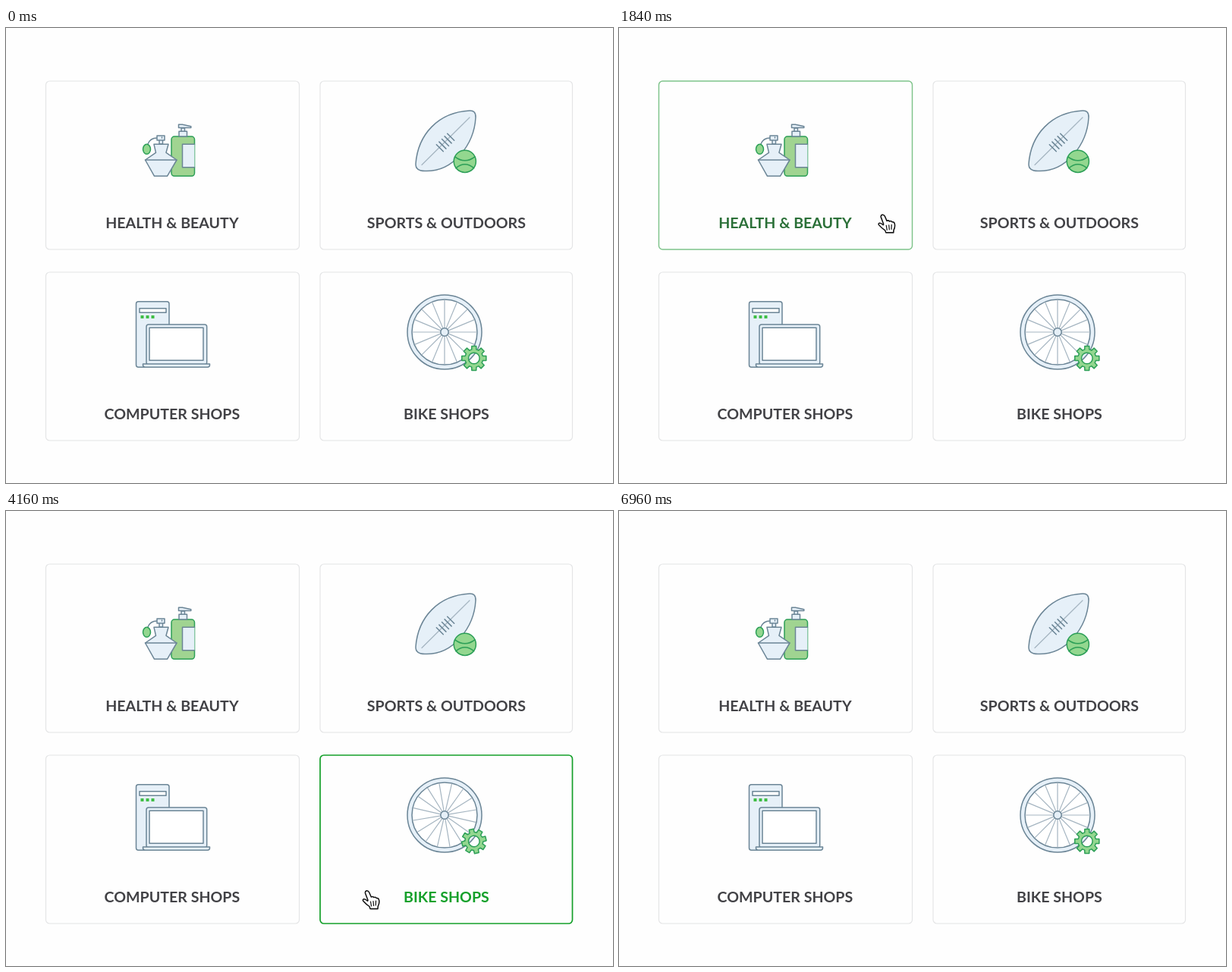
An HTML page for the animation above (7000 ms loop, 800 px wide and 600 px high).

```html
<!DOCTYPE html>
<html lang="en">
<head>
<meta charset="utf-8">
<title>Shop categories</title>
<style>
  html, body { margin: 0; width: 100%; height: 100%; overflow: hidden; background: #fefefe; }
  svg { display: block; width: 800px; height: 600px; }
  text { font: 700 19.6px Lato, "Open Sans", sans-serif; text-anchor: middle; }
  .card { fill: #fefefe; }
  .icon { fill: #e6f0f8; stroke: #6b8596; stroke-width: 1.5; stroke-linejoin: round; stroke-linecap: round; }
  .white { fill: #fff; }
  .line { fill: none; }
  .thin { stroke: #a5b5c1; stroke-width: 1.2; }
  .green { fill: #93d78f; stroke: #2c9f57; }
  .leaf { fill: #a0d491; }
</style>
</head>
<body>
<svg viewBox="0 0 800 600">
  <g id="cards"></g>

  <g class="icon">
    <path class="line" d="M187 153Q190 145 199 145"/>
    <ellipse class="green" cx="185.5" cy="159.8" rx="5" ry="6.5"/>
    <path d="M199 142h10v6h-10zM202 148h4.5v5h-4.5z"/>
    <path class="line" d="M205.5 144v1"/>
    <rect class="green leaf" x="218" y="143" width="30.5" height="52.3" rx="4"/>
    <path d="M248.5 153.3h-16v30.5h16"/>
    <path d="M195 153.3h19l-3 11 14 9.7-12.5 21.3h-17L183.5 174l14-9.7z"/>
    <path class="line" d="M183.5 174H225"/>
    <path d="M228 136.3h10.5v6.7H228zM231 132h4.5v4.3H231z"/>
    <path d="M227.5 127.2h5l11.3 2.6v1.8h-16.3z"/>
    <path id="drop" d="M0-4C1.1-2 2.4-.6 2.4 1A2.4 2.4 0 0 1-2.4 1C-2.4-.6-1.1-2 0-4z"/>
  </g>

  <g class="icon">
    <path d="M611 109Q619.5 108.500 619 118C617 153 590 190 552 188.500Q539.500 188.500 540 179C543 140 570 111 611 109z"/>
    <path class="thin" d="M548 180.500L611 118"/>
    <path id="laces" class="line"/>
    <g id="ball" class="green">
      <circle r="14.600"/>
      <path class="line" d="M-13-6Q0 4 13-6M-12 9Q0-1 12 9"/>
    </g>
  </g>

  <g class="icon">
    <rect x="171.5" y="360.8" width="43.5" height="86.500" rx="3"/>
    <rect class="white" x="176" y="369.800" width="35" height="5.400"/>
    <path d="M177.500 379h4v4h-4zm7 0h4v4h-4zm7 0h4v4h-4z" style="fill:#3fbd45;stroke:none"/>
    <rect x="185" y="391" width="79.700" height="53" rx="3"/>
    <rect class="white" x="189" y="395.300" width="71" height="43"/>
    <rect id="screen" x="189.7" width="69.600" style="fill:#93d78f;stroke:none"/>
    <path d="M180.500 443h88v1.500q0 2.700-3 2.700h-82q-3 0-3-2.700z"/>
  </g>

  <g class="icon">
    <circle cx="578" cy="401" r="49"/>
    <circle class="white" cx="578" cy="401" r="43"/>
    <path id="spokes" class="thin"/>
    <circle cx="578" cy="401" r="5.200"/>
    <path id="gear" class="green" fill-rule="evenodd"/>
  </g>

  <g id="hand" stroke-linejoin="round" stroke-linecap="round">
    <path id="shadow" fill="#000" opacity=".2" transform="translate(.5 1.500)"/>
    <path id="palm" fill="#fff" stroke="#111" stroke-width="1.500"/>
    <path d="M4.500 14l1 6M8 13.500l.6 6M11.500 13l-.2 6" fill="none" stroke="#111" stroke-width="1.200"/>
  </g>
</svg>
<script>
const LOOP = 7000;
const $ = id => document.getElementById(id);
const set = (el, attrs) => { for (const k in attrs) el.setAttribute(k, attrs[k]); };
const ramp = (t, a, b) => Math.min(1, Math.max(0, (t - a) / (b - a)));
const ease = p => p * p * (3 - 2 * p);
const move = (t, a, b) => ease(ramp(t, a, b));
const pulse = (t, on, off, time = 160) => move(t, on, on + time) - move(t, off, off + time);
const mix = (a, b, p) => `rgb(${a.map((v, i) => v + (b[i] - v) * p)})`;

const GREEN = [20, 160, 42], BORDER = [228, 229, 230], INK = [66, 66, 70];

// Left, top, label, hover start, hover end
const cards = [
  [52.5, 70, "HEALTH & BEAUTY", 520, 1760],
  [414, 70, "SPORTS & OUTDOORS", 1840, 3100],
  [52.5, 322, "COMPUTER SHOPS", 4560, 6220],
  [414, 322, "BIKE SHOPS", 3200, 4460]
].map(([x, y, name, on, off]) => {
  const make = (tag, attrs) => {
    const el = document.createElementNS("http://www.w3.org/2000/svg", tag);
    set(el, attrs);
    return $("cards").appendChild(el);
  };
  const box = make("rect", { class: "card", x, y, width: x < 100 ? 334 : 332.5, height: 222, rx: 5 });
  const label = make("text", { x: x + 166.4, y: y + 194 });
  label.textContent = name;
  return { box, label, on, off };
});

// Static paths built by rule
set($("laces"), { d: [-2, -1, 0, 1, 2].map(i =>
  `M${574.5 + i * 3.6} ${146.500 - i * 3.6}l9 9`).join("") });

let spokes = "";
for (let i = 0; i < 16; i++) {
  const a = i * Math.PI / 8, c = Math.cos(a), s = Math.sin(a);
  spokes += `M${5 * c} ${5 * s}L${42 * c} ${42 * s}`;
}
set($("spokes"), { d: spokes });

const teeth = [];
for (let i = 0; i < 8; i++)
  for (const [da, r] of [[-.26, 12], [-.18, 16.300], [.18, 16.300], [.26, 12]]) {
    const a = i * Math.PI / 4 + da;
    teeth.push(`${r * Math.cos(a)} ${r * Math.sin(a)}`);
  }
set($("gear"), { d: `M${teeth.join("L")}zM7.300 0A7.300 7.300 0 1 0-7.300 0A7.300 7.300 0 1 0 7.300 0z` });

const palm = "M-2.500 3Q-3 .5-.7-.2Q1.500-.5 2.700 2L5.300 8Q7.500 6.800 8.800 8.600Q11 7.500 12.300 9.500" +
  "Q15 9 15.600 12Q16.500 16 14.300 20L14 23.500H4L3 20.500Q-1.500 17.500-5 13.500Q-6.500 11.500-4.500 10.800" +
  "Q-2.500 10.500 .5 13.300L1 12.300z";
for (const id of ["palm", "shadow"]) set($(id), { d: palm });

// Each stop: start time, end time, x, y
const start = [58, 284];
const stops = [
  [160, 820, 190, 251], [1480, 2240, 531, 241], [2940, 3560, 476, 501],
  [4360, 4800, 248, 503], [4880, 5700, 246.5, 503], [5760, 6440, 62, 492]
];

function draw(t) {
  for (const { box, label, on, off } of cards) {
    const p = pulse(t, on, off);
    set(box, { stroke: mix(BORDER, GREEN, p), "stroke-width": 1.200 + .5 * p });
    set(label, { fill: mix(INK, GREEN, p) });
  }

  const fall = ramp(t, 1220, 1420);
  set($("drop"), {
    transform: `translate(243.500 ${136 + 6 * fall * fall}) scale(${move(t, 820, 1100)})`,
    opacity: t < 820 ? 0 : 1 - ramp(t, 1320, 1420)
  });

  set($("ball"), { transform: `translate(604.800 175.800) rotate(${360 * move(t, 1880, 2780)})` });

  const spin = move(t, 3240, 4500);
  set($("spokes"), { transform: `translate(578 401) rotate(${180 * spin})` });
  set($("gear"), { transform: `translate(616.800 435.500) rotate(${-180 * spin})` });

  const h = 41.600 * pulse(t, 4720, 6220, 500);
  set($("screen"), { y: 416.800 - h / 2, height: h });

  let [x, y] = start;
  for (const [a, b, toX, toY] of stops) {
    const p = move(t, a, b);
    x += (toX - x) * p;
    y += (toY - y) * p;
  }
  set($("hand"), { transform: `translate(${x} ${y})`, opacity: pulse(t, 120, 6260, 180) });
}

function tick() {
  draw(performance.now() % LOOP);
  requestAnimationFrame(tick);
}
tick();
</script>
</body>
</html>
```
